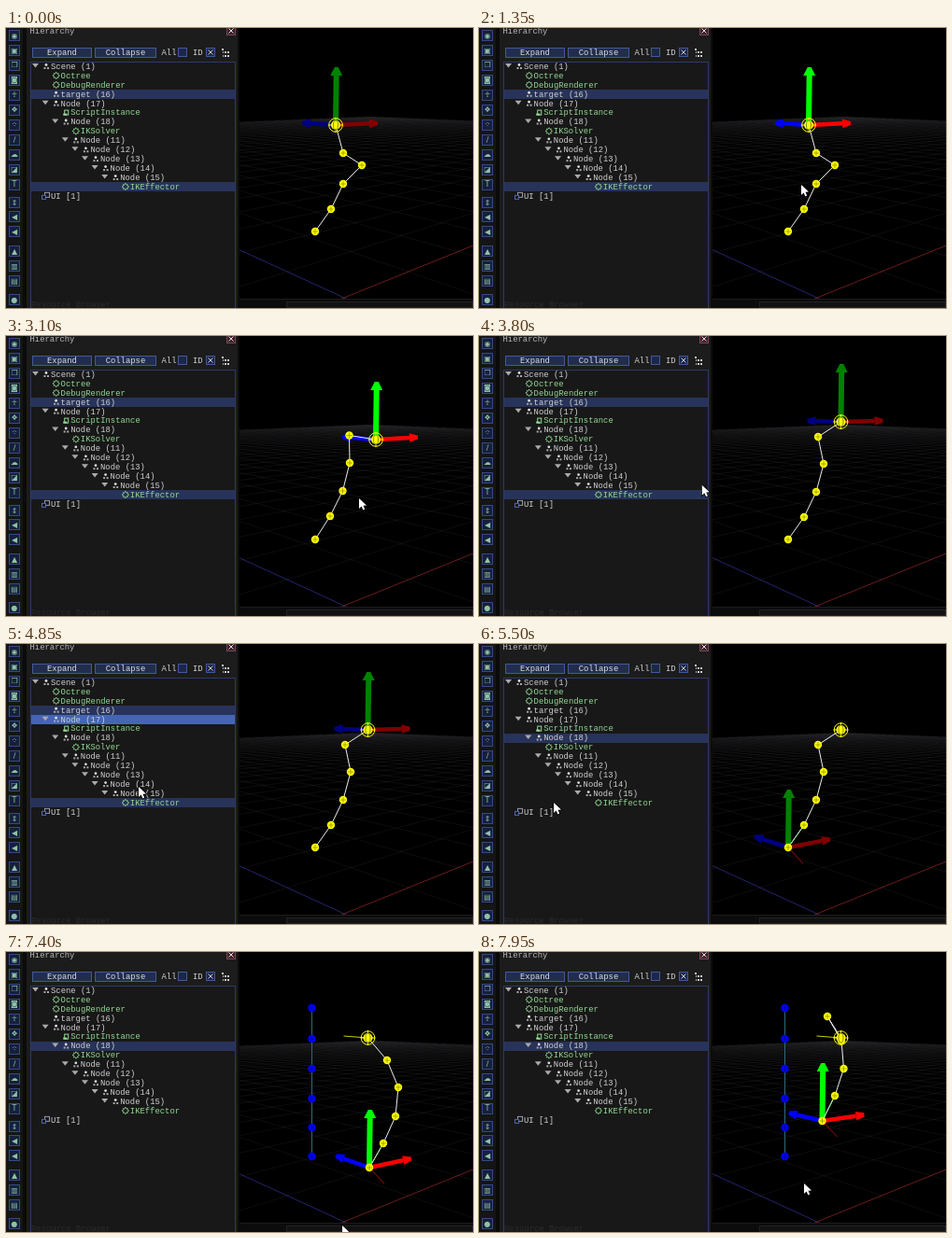
Recreate the animation shown at these times as an HTML page with a canvas. Size 500x300 px, loop 8 s.

```html
<!DOCTYPE html>
<html>
<head>
<meta charset="utf-8">
<style>
html, body { margin: 0; width: 100%; height: 100%; overflow: hidden; background: #000; }
canvas { display: block; }
</style>
</head>
<body>
<canvas id="stage" width="500" height="300"></canvas>
<script>
const LOOP = 8000, STEP = 50;
const MONO = '"Liberation Mono", "DejaVu Sans Mono", monospace';
let g;

// ---------- drawing helpers ----------
function rect(x, y, w, h, fill, border) {
  if (fill) { g.fillStyle = fill; g.fillRect(x, y, w, h); }
  if (border) { g.strokeStyle = border; g.lineWidth = 1; g.strokeRect(x + .5, y + .5, w - 1, h - 1); }
}
function line(pts, color, width = 1) {
  g.strokeStyle = color;
  g.lineWidth = width;
  g.beginPath();
  pts.forEach(p => g.lineTo(p[0], p[1]));
  g.stroke();
}
function poly(pts, color) {
  g.fillStyle = color;
  g.beginPath();
  pts.forEach(p => g.lineTo(p[0], p[1]));
  g.fill();
}
function disc(x, y, r, color) {
  g.fillStyle = color;
  g.beginPath();
  g.arc(x, y, r, 0, 7);
  g.fill();
}
function text(s, x, y, color, font = '8.9px ' + MONO) {
  g.font = font;
  g.fillStyle = color;
  g.textBaseline = 'middle';
  g.fillText(s, x, y);
}

// ---------- hierarchy tree ----------
// depth, label, kind: n = node, c = component, u = interface root
const rows = [
  [0, 'Scene (1)', 'n', 1], [1, 'Octree', 'c'], [1, 'DebugRenderer', 'c'], [1, 'target (16)', 'n'],
  [1, 'Node (17)', 'n', 1], [2, 'ScriptInstance', 'c'], [2, 'Node (18)', 'n', 1], [3, 'IKSolver', 'c'],
  [3, 'Node (11)', 'n', 1], [4, 'Node (12)', 'n', 1], [5, 'Node (13)', 'n', 1], [6, 'Node (14)', 'n', 1],
  [7, 'Node (15)', 'n', 1], [8, 'IKEffector', 'c'], [0, 'UI [1]', 'u']
];
const TARGET = 3, NODE17 = 4, NODE18 = 6, EFFECTOR = 13;
const rowY = i => 41 + i * 9.92;
const GREEN = '#94d894', GREY = '#d0d0d0';

function drawRow([depth, label, kind, open], i) {
  const x = 48 + depth * 10.6, y = rowY(i), ix = x - 5;
  text(label, x, y + .5, kind === 'c' ? GREEN : GREY);
  if (open) poly([[x - 20, y - 3], [x - 13, y - 3], [x - 16.5, y + 1.5]], '#aaa');
  if (kind === 'n') {
    disc(ix, y - 1.5, 1.4, '#ddd');
    rect(ix - 2.5, y + 1, 2, 2, '#aaa');
    rect(ix + 1, y + 1, 2, 2, '#aaa');
  } else if (kind === 'u') {
    rect(ix - 2, y - 4, 6, 6, null, '#99a');
    rect(ix - 5, y - 1, 5, 5, '#171717', '#5068b0');
  } else if (label === 'ScriptInstance') {
    rect(ix - 2, y - 3, 5, 6, null, GREEN);
    rect(ix - 3, y + 1, 4, 2, GREEN);
  } else {
    for (let k = 0; k < 8; k++) {
      const a = k * Math.PI / 4;
      rect(ix + Math.round(Math.cos(a) * 2.6) - .7, y + Math.round(Math.sin(a) * 2.6) - .7, 1.5, 1.5, GREEN);
    }
  }
}

// ---------- fixed scenery ----------
const ORIGIN = [362, 289], VP_RED = [890, 75], VP_BLUE = [-105, 75], CELL = .15;
function ground(u, v) {
  const a = u * CELL, b = v * CELL, w = 1 + a + b;
  return [0, 1].map(k => (ORIGIN[k] + a * VP_RED[k] + b * VP_BLUE[k]) / w);
}
function drawGround() {
  const N = 32, near = -.06 / CELL;
  for (let i = -N; i <= N; i++) {
    const start = Math.max(-N, near - i);
    if (start > N) continue;
    const color = 'rgba(150,150,160,.085)';
    line([ground(i, start), ground(i, N)], i ? color : '#24246e');
    line([ground(start, i), ground(N, i)], i ? color : '#6e1c1c');
  }
  rect(250, 290, 250, 10, '#0c0c0c');
  rect(250, 290, 250, 1, '#1b1b1b');
  rect(300, 293, 200, 7, '#121212', '#222');
}
function button(label, x, w) {
  rect(x, 21, w, 11, '#222d4c', '#42599a');
  text(label, x + w / 2 - label.length * 2.67, 27, '#ddd');
}
function drawPanel() {
  rect(0, 0, 250, 300, '#151515');
  rect(18, 0, 4, 300, '#0b0b0b');
  rect(22, 0, 227, 300, '#1c1c1c');
  rect(248, 0, 2, 300, '#0c0c0c');
  const icons = '◉▣❒◙☥❖⁘∕☁◪T⇕◀◀▲▥▤●';
  [...icons].forEach((c, i) => {
    const y = 8 + i * 15.95 + (i > 10 ? 4 : 0) + (i > 13 ? 5 : 0) + (i > 16 ? 4 : 0) - (i > 11 ? 1 : 0);
    rect(3, Math.round(y) - 6, 12, 12, '#16203a', '#344a84');
    g.textAlign = 'center';
    text(c, 9, y + .5, '#8fc3a4', '8px "DejaVu Sans", sans-serif');
    g.textAlign = 'left';
  });
  text('Hierarchy', 25.5, 3.5, '#b8b8b8');
  rect(236, -2, 10, 10, '#3c2029', '#7c4650');
  line([[238.5, .5], [243.5, 5.5]], '#ddd');
  line([[243.5, .5], [238.5, 5.5]], '#ddd');
  button('Expand', 28, 64);
  button('Collapse', 95, 66);
  text('All', 166.5, 26.5, GREY);
  rect(184, 21, 10, 10, '#1c2748', '#42599a');
  text('ID', 200, 26.5, GREY);
  rect(214, 21, 10, 10, '#1c2748', '#42599a');
  line([[216.5, 23.5], [221.5, 28.5]], '#ccc');
  line([[221.5, 23.5], [216.5, 28.5]], '#ccc');
  rect(231, 22, 2, 2, '#ccc');
  for (let i = 0; i < 2; i++) {
    rect(232, 25 + i * 4, 1, 2, '#aaa');
    rect(234, 25 + i * 4, 2, 2, '#ccc');
    rect(237, 25 + i * 4, 2, 2, '#ccc');
  }
  rect(26, 36, 220, 270, '#181818', '#2c3a66');
  text('Resource Browser', 27, 297, '#2b2b2b');
}

// ---------- motion ----------
// keys: [time, x, y, ...], linear in between
function at(keys, t) {
  let i = 1;
  while (i < keys.length - 1 && keys[i][0] < t) i++;
  const a = keys[i - 1], b = keys[i];
  const k = Math.min(1, Math.max(0, (t - a[0]) / (b[0] - a[0])));
  return a.slice(1).map((v, n) => v + (b[n + 1] - v) * k);
}
const targetPath = [
  [1450, 353, 104], [1900, 386, 100], [2200, 374, 98], [2300, 374, 98], [2650, 384, 92],
  [3100, 396, 111], [3150, 397, 110], [3300, 403, 104], [3550, 387.5, 92]
];
const rootPath = [
  [7050, 331, 218], [7400, 389, 231], [7550, 411, 205], [7700, 409, 165],
  [7800, 402, 180], [7850, 395, 186], [7950, 367.5, 181]
];
const innerJoints = [
  [1450, 348, 194, 361, 167, 381, 147, 361, 134],
  [2200, 348, 194, 361, 167, 380, 147, 369, 128],
  [3100, 347, 193, 360.5, 166, 368, 136, 367.5, 106.5],
  [3550, 348, 194, 361, 167, 369, 137, 363, 108],
  [7050, 348, 194, 361, 167, 369, 137, 363, 108],
  [7400, 404, 205, 417, 176, 420, 145, 408, 116],
  [7700, 419, 137, 419, 107, 408, 79, 390, 62],
  [7950, 381, 154, 390.5, 125, 388, 95, 373, 69]
];
const cursorPath = [
  [50, 47, 54], [350, 111, 168], [550, 111, 168], [1300, 345, 168], [1450, 345, 168],
  [1900, 376, 165], [2200, 365, 162], [2300, 365, 162], [2650, 368, 156], [3100, 378, 174],
  [3300, 386, 168], [3550, 370, 156], [3950, 160, 162], [4250, 142, 153], [4850, 142, 153],
  [5200, 100, 170], [5650, 70, 170], [5800, 70, 170], [6350, 364, 227], [6450, 362, 236],
  [6700, 362, 236], [6850, 302, 281], [7050, 302, 281], [7400, 360, 293], [7550, 382, 272],
  [7700, 384, 232], [7850, 375, 252], [7950, 348, 248]
];

// ---------- moving parts ----------
function arrow([x, y], dx, dy, color, shaft, half) {
  const len = Math.hypot(dx, dy), ux = dx / len, uy = dy / len;
  const bx = x + dx - ux * 9, by = y + dy - uy * 9;
  line([[x, y], [bx, by]], color, shaft);
  poly([[bx - uy * half, by + ux * half], [x + dx - uy * 2, y + dy + ux * 2],
        [x + dx + uy * 2, y + dy - ux * 2], [bx + uy * half, by - ux * half]], color);
}
function drawGizmo(p, bright) {
  const c = bright ? 255 : 130;
  arrow(p, -36, -(p[1] - 76) * .082, `rgb(0,0,${c})`, 4.5, 4.8);
  arrow(p, 45, -(p[1] - 70) * .06, `rgb(${c},0,0)`, 4.5, 4.8);
  arrow(p, .8, -62, `rgb(0,${c},0)`, 6, 6.5);
}
function joint([x, y], color, dark) {
  disc(x, y, 4.2, color);
  line([[x - 3, y], [x + 3, y]], dark, .6);
  line([[x, y - 3], [x, y + 3]], dark, .6);
}
function drawTarget([x, y]) {
  const yellow = '#ff0';
  disc(x, y, 5, yellow);
  g.strokeStyle = yellow;
  g.lineWidth = 1;
  g.beginPath();
  g.arc(x, y, 7.3, 0, 7);
  g.stroke();
  line([[x - 8, y], [x + 8, y]], yellow);
  line([[x, y - 8], [x, y + 8]], yellow);
  g.strokeStyle = '#553';
  g.lineWidth = .7;
  g.beginPath();
  g.ellipse(x, y, 2.5, 5, 0, 0, 7);
  g.stroke();
}
function drawCursor([x, y]) {
  const shape = [[0, 0], [0, 11], [2.6, 8.6], [4.4, 12.4], [6.2, 11.6], [4.5, 7.8], [8, 7.6]]
    .map(p => [x + p[0], y + p[1]]);
  line([...shape, shape[0]], '#000', 1.5);
  poly(shape, '#fff');
}

const ctx = document.getElementById('stage').getContext('2d');
const backdrop = document.createElement('canvas');
backdrop.width = 500;
backdrop.height = 300;
g = backdrop.getContext('2d');
rect(0, 0, 500, 300, '#000');
drawGround();
drawPanel();
g = ctx;

function draw(t) {
  const rootMode = t >= 5200;
  g.drawImage(backdrop, 0, 0);

  (rootMode ? [NODE18] : [TARGET, EFFECTOR]).forEach(i => rect(27, Math.round(rowY(i)) - 5, 218, 10, '#27335a'));
  if (t >= 4000 && !rootMode) rect(27, Math.round(rowY(NODE17)) - 5, 218, 10, '#4565b4');
  rows.forEach(drawRow);

  const target = at(targetPath, t), root = at(rootPath, t), inner = at(innerJoints, t);
  const chain = [root, ...[0, 2, 4, 6].map(i => inner.slice(i, i + 2)), target];

  if (t >= 5700) {
    const rest = [219, 188, 157, 125, 93, 60].map(y => [327.5, y]);
    line(rest, '#2c6a78');
    rest.forEach(p => joint(p, '#00f', '#008'));
    line([[target[0] - 26, target[1] - 2], target], '#cc0');
  }
  if (rootMode) line([root, [root[0] + 16, root[1] + 17]], '#a01010');

  const bright = t >= 1350 && t < 3600 || t >= 6800;
  drawGizmo(rootMode ? root : target, bright);
  line(chain, '#eee');
  if (rootMode) line(chain.slice(0, 2), '#9e9');
  chain.slice(0, 5).forEach(p => joint(p, '#ff0', '#770'));
  drawTarget(target);
  if (t >= 50) drawCursor(at(cursorPath, t));
}

function frame() {
  const t = performance.now() % LOOP;
  draw(Math.floor(t / STEP) * STEP);
  requestAnimationFrame(frame);
}
frame();
</script>
</body>
</html>
```
